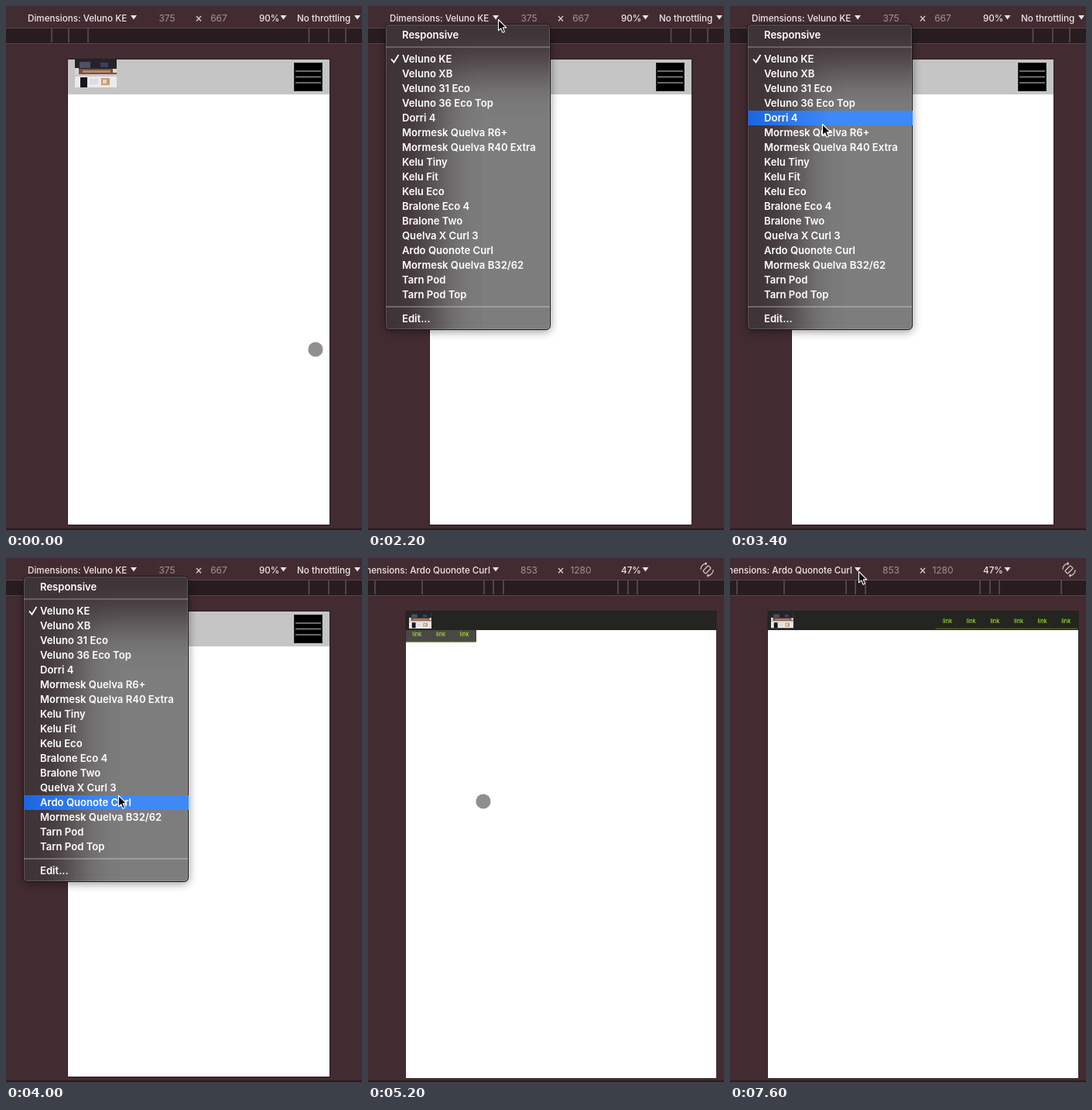
An HTML page for the animation above (8000 ms loop, 460 by 676 pixels).

```html
<!DOCTYPE html>
<html lang="en">
<head>
<meta charset="utf-8">
<title>Device toolbar</title>
<style>
  html, body { margin: 0; width: 100%; height: 100%; overflow: hidden; background: #432c31; }
  svg { display: block; font: 500 11.65px Inter, Roboto, sans-serif; fill: #eee6e8; }
  .dim { font-size: 12px; font-weight: 400; fill: #a09496; }
  .menu { font-size: 13.1px; font-weight: 600; fill: #fff; }
  .link { font-size: 7.4px; font-weight: 400; fill: #adff2f; text-anchor: middle; }
  .mid { text-anchor: middle; }
  .end { text-anchor: end; }
</style>
</head>
<body>
<svg id="stage" width="460" height="676" viewBox="0 0 460 676"></svg>
<script>
const LOOP = 8000, STEP = 200;
const MENU_OPEN = 1400, MENU_FADE = 5000, SWITCH = 5200, NAV_START = 5030;

const devices = [
  'Veluno KE', 'Veluno XB', 'Veluno 31 Eco', 'Veluno 36 Eco Top', 'Dorri 4',
  'Mormesk Quelva R6+', 'Mormesk Quelva R40 Extra', 'Kelu Tiny', 'Kelu Fit', 'Kelu Eco',
  'Bralone Eco 4', 'Bralone Two', 'Quelva X Curl 3', 'Ardo Quonote Curl',
  'Mormesk Quelva B32/62', 'Tarn Pod', 'Tarn Pod Top'
];
const rows = [['Responsive', 37], ...devices.map((name, i) => [name, 68 + 19 * i]), ['Edit...', 403]];

// time, x, y of the pointer
const path = [
  [0, 400, 443], [200, 394, 420], [400, 345, 300], [600, 262, 140], [800, 182, 36],
  [1000, 170, 16.5], [1200, 168, 17], [2600, 168, 17], [2800, 160, 30], [3000, 146, 66],
  [3200, 129, 108], [3400, 119, 152], [3600, 125, 222], [3800, 136, 276], [4000, 145, 306],
  [4200, 148, 312], [5000, 148, 312], [5200, 149, 314], [6200, 149, 314], [6400, 153, 286],
  [6600, 166, 190], [6800, 172, 82], [7000, 168, 28], [7200, 166, 17]
];

const rect = (x, y, w, h, fill, more = '') =>
  `<rect x="${x}" y="${y}" width="${w}" height="${h}" fill="${fill}" ${more}/>`;
const text = (x, y, str, cls = '') => `<text x="${x}" y="${y}" class="${cls}">${str}</text>`;
const caret = x => `<path d="M${x} 12h8l-4 5.5z"/>`;

const ruler = ticks => rect(0, 28, 460, 21, '#57434a') + rect(0, 29, 460, 19, '#281c20') +
  ticks.map(x => rect(x - .75, 29, 1.5, 18, '#5f5055')).join('');

const sizes = (w, h, zoom) =>
  text(208, 20, w, 'dim mid') + text(275, 20, h, 'dim mid') +
  '<path d="M246 13l6 6.5m0-6.5l-6 6.5" stroke="#d3c8cb" stroke-width="1.4"/>' +
  text(327, 20, zoom) + caret(354.5);

// header picture, 54 x 36 units
const photo = (x, y, scale) => `<g transform="translate(${x} ${y}) scale(${scale})">` +
  rect(0, 0, 54, 36, '#eceaea') + rect(0, 0, 54, 14, '#24232b') + rect(6, 3, 14, 8, '#4b5166') +
  rect(33, 4, 10, 6, '#39415b') + rect(0, 12, 54, 7, '#7b5140') + rect(10, 14, 36, 3, '#b78a68') +
  rect(0, 11, 5, 8, '#d9d4d6') + rect(49, 12, 5, 5, '#ddd6d3') + rect(0, 19, 54, 3, '#cfc7c8') +
  rect(7, 23, 9, 13, '#15151b') + rect(19, 25, 11, 7, '#dcdce1') + rect(34, 24, 11, 9, '#c89b78') +
  rect(36, 26, 5, 5, '#ead3be') + '</g>';

const phone = `<g id="phone">
  ${text(28, 20, 'Dimensions: ' + devices[0])}${caret(161)}
  ${sizes(375, 667, '90%')}${text(376, 20, 'No throttling')}${caret(450)}
  ${ruler([59, 81, 106, 391.5, 417, 439])}
  ${rect(79, 68, 340, 602, '#2a1a1e')}${rect(80, 69, 338, 600, '#fff')}${rect(80, 69, 338, 45, '#c5c5c5')}
  ${photo(89, 69, 1)}
  ${rect(372.5, 73.5, 36, 36, '#000', 'stroke="#1d2a25"')}
  ${[84, 91.5, 99].map(y => rect(374, y - .75, 33, 1.5, '#8d8d8d')).join('')}
</g>`;

const navItems = draw => Array.from({ length: 6 }, (_, i) => draw(265.6 + 30.65 * i)).join('');
const tablet = `<g id="tablet">
  ${text(158, 20, 'Dimensions: ' + devices[13], 'end')}${caret(161)}
  ${sizes(853, 1280, '47%')}
  <g transform="translate(438 15) rotate(45)" fill="none" stroke="#cfc4c7" stroke-width="1.3">
    <rect x="-2.5" y="-5" width="5" height="10" rx="1.2"/>
    <path d="M-6 5.5A8 8 0 0 1-6-5.5M6-5.5A8 8 0 0 1 6 5.5M-8-5h2.2v2.2M8 5h-2.2v-2.2"/>
  </g>
  ${ruler([9, 70, 150, 162, 175, 323, 336, 348, 428])}
  ${rect(48.5, 68, 402, 603.5, '#2a1a1e')}${rect(49, 69, 401, 602, '#fff')}
  <g clip-path="url(#page)">
    <g class="nav">${rect(265.6, 68, 184.4, 23, '#4a4846')}</g>
    ${rect(49, 68, 401, 25, '#242420')}
    <g class="nav">
      ${navItems(x => rect(x, 90.7, 30.2, 1, '#55801a'))}
      ${navItems(x => text(x + 15.4, 84, 'link', 'link'))}
    </g>
  </g>
  ${photo(53, 71, .535)}
</g>`;

const menu = `<g id="menu">
  ${rect(23, 32, 213, 388, '#000', 'rx="6" opacity=".42" filter="url(#shadow)"')}
  <g clip-path="url(#panel)">
    ${rect(22, 23, 215, 395, '#3e3337')}
    ${rect(88, 83, 330, 500, '#7d7d7d', 'filter="url(#glow)"')}
  </g>
  ${rect(22.5, 23.5, 213, 394, 'none', 'rx="5" stroke="#1c1517"')}
  ${rect(23.5, 24.5, 211, 392, 'none', 'rx="4" stroke="#fff" stroke-opacity=".16"')}
  ${rect(23, 52, 212, 2, '#fff', 'opacity=".22"')}${rect(23, 387, 212, 2, '#fff', 'opacity=".25"')}
  ${rect(23, 0, 213, 19, 'url(#blue)', 'id="hover"')}
  <g class="menu">
    ${rows.map(([name, y]) => text(44, y + 4.8, name)).join('')}
    <path d="M30 68.5l3.5 4.2L39.5 63" fill="none" stroke="#fff" stroke-width="1.9"/>
  </g>
</g>`;

const $ = id => document.getElementById(id);
$('stage').innerHTML = `<defs>
  <clipPath id="page">${rect(49, 68, 401, 603, '#fff')}</clipPath>
  <clipPath id="panel">${rect(22.5, 23.5, 213, 394, '#fff', 'rx="5"')}</clipPath>
  <filter id="glow" x="-50%" y="-50%" width="200%" height="200%"><feGaussianBlur stdDeviation="28"/></filter>
  <filter id="shadow" x="-20%" y="-20%" width="140%" height="140%"><feGaussianBlur stdDeviation="6"/></filter>
  <linearGradient id="blue"><stop stop-color="#1a66df"/><stop offset=".5" stop-color="#3f88f7"/></linearGradient>
</defs>
${rect(0, 0, 460, 676, '#432c31')}${rect(0, 674, 460, 2, '#2b1a1f')}
${phone}${tablet}${menu}
<circle id="dot" r="9.6" fill="#8f8f8f"/>
<path id="arrow" d="M.5.5V14.8L3.7 11.8 6 17.2 8.5 16.1 6.2 10.9H10.8Z"
  fill="#0c0a0b" stroke="#fff" stroke-width="1.1" stroke-linejoin="round"/>`;

const slides = [...document.querySelectorAll('.nav')].map(nav => {
  const slide = nav.animate(
    [{ transform: 'translate(-401px, 22px)' }, { transform: 'translate(0px, 0px)' }],
    { duration: 1000, easing: 'ease', fill: 'both' });
  slide.pause();
  return slide;
});

function pointer(t) {
  const i = path.findIndex(p => p[0] > t);
  if (i < 0) return path[path.length - 1].slice(1);
  const [t0, x0, y0] = path[i - 1], [t1, x1, y1] = path[i];
  const k = (t - t0) / (t1 - t0);
  return [x0 + (x1 - x0) * k, y0 + (y1 - y0) * k];
}

const show = (id, on) => { $(id).style.display = on ? '' : 'none'; };

function render(time) {
  const t = Math.floor(time % LOOP / STEP) * STEP;
  const [x, y] = pointer(t);
  const open = t >= MENU_OPEN && t < SWITCH;
  const touch = !open && y > 69;

  show('phone', t < SWITCH);
  show('tablet', t >= SWITCH);
  show('menu', open);
  $('menu').style.opacity = t >= MENU_FADE ? .5 : 1;
  for (const slide of slides) slide.currentTime = Math.max(0, Math.min(1000, t - NAV_START));

  // the chosen row blinks off just before the menu closes
  const row = rows.find(r => Math.abs(y - r[1]) <= 9.5);
  show('hover', row && t !== MENU_FADE - STEP);
  if (row) $('hover').setAttribute('y', row[1] - 9);

  show('dot', touch);
  show('arrow', !touch);
  $(touch ? 'dot' : 'arrow').setAttribute('transform', `translate(${x} ${y})`);
}

const start = performance.now();
function tick() {
  render(performance.now() - start);
  requestAnimationFrame(tick);
}
tick();
</script>
</body>
</html>
```
